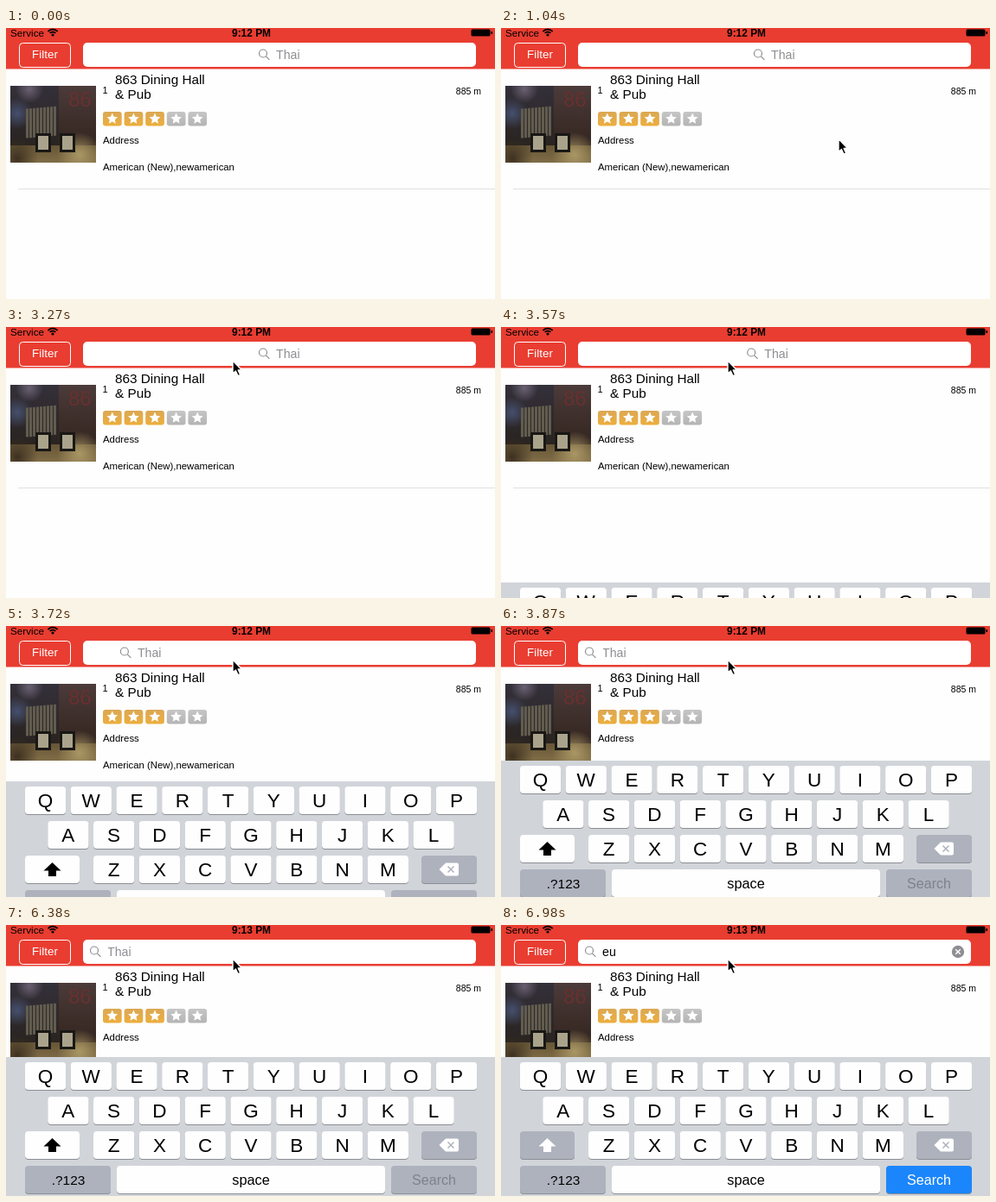
Write an HTML page with a canvas that moves like this. It is 565 px wide and 314 px high and loops after 8 s.

```html
<!DOCTYPE html>
<html lang="en">
<head>
<meta charset="utf-8">
<title>Restaurant search</title>
<style>
html, body { margin: 0; width: 100%; height: 100%; overflow: hidden; background: #fefefe; }
canvas { display: block; width: 565px; height: 314px; }
</style>
</head>
<body>
<canvas id="stage" width="565" height="314"></canvas>
<script>
const ctx = document.getElementById('stage').getContext('2d');
const LOOP = 8000;
const TICK = 148.5; // the picture updates on this beat
const FONT = '"Liberation Sans", Arial, sans-serif';
const RED = '#e93d31';
const GRAY = '#8e8e93';
const KEY = '#fefefe';
const DARK_KEY = '#adb2bd';

const lerp = (a, b, u) => a + (b - a) * u;
const progress = (t, from, to) => Math.min(1, Math.max(0, (t - from) / (to - from)));

function text(str, x, y, size, color = '#000', align = 'left', weight = '') {
  ctx.font = `${weight} ${size}px ${FONT}`;
  ctx.textAlign = align;
  ctx.fillStyle = color;
  ctx.fillText(str, x, y);
}

function rect(x, y, w, h, color) {
  ctx.fillStyle = color;
  ctx.fillRect(x, y, w, h);
}

function round(x, y, w, h, r, color) {
  ctx.beginPath();
  ctx.roundRect(x, y, w, h, r);
  ctx.fillStyle = color;
  ctx.fill();
}

function poly(points, color) {
  ctx.beginPath();
  points.forEach(([x, y]) => ctx.lineTo(x, y));
  ctx.closePath();
  ctx.fillStyle = color;
  ctx.fill();
}

function disc(x, y, r, color) {
  ctx.beginPath();
  ctx.arc(x, y, r, 0, Math.PI * 2);
  ctx.fillStyle = color;
  ctx.fill();
}

function stroke(color, width) {
  ctx.strokeStyle = color;
  ctx.lineWidth = width;
  ctx.stroke();
}

function cross(x, y, r, color) {
  ctx.beginPath();
  for (const side of [-1, 1]) {
    ctx.moveTo(x - r, y - r * side);
    ctx.lineTo(x + r, y + r * side);
  }
  stroke(color, 1.5);
}

function vertical(y, h, top, bottom) {
  const fill = ctx.createLinearGradient(0, y, 0, y + h);
  fill.addColorStop(0, top);
  fill.addColorStop(1, bottom);
  return fill;
}

function drawHeader(tick) {
  rect(0, 0, 565, 47.5, RED);
  text('Service', 5, 9.7, 11.7);
  for (const r of [4.4, 7.4]) {
    ctx.beginPath();
    ctx.arc(54, 9, r, -Math.PI * .77, -Math.PI * .23);
    stroke('#000', 1.6);
  }
  disc(54, 8, 1.6, '#000');
  text(tick < 30 ? '9:12 PM' : '9:13 PM', 283.5, 9.7, 11.9, '#000', 'center', 'bold');
  round(537.5, 1.5, 22, 8, 1.5, '#000');
  rect(560.5, 4, 1.5, 3, '#000');

  ctx.beginPath();
  ctx.roundRect(15.5, 17.5, 59, 28, 4);
  stroke('#fff', 1);
  text('Filter', 45, 35, 13.4, '#fff', 'center');
  round(89, 17, 454, 28, 5, '#fff');
}

function drawSearch(tick, slide) {
  const ease = (1 - Math.cos(Math.PI * progress(slide, 0, 250))) / 2;
  const x = lerp(312, 117, ease);
  ctx.beginPath();
  ctx.arc(x - 15, 29.5, 4.5, 0, Math.PI * 2);
  ctx.moveTo(x - 11.8, 32.7);
  ctx.lineTo(x - 7.6, 36.9);
  stroke(GRAY, 1.2);

  const typed = 'eu'.slice(0, Math.max(0, tick - 45));
  text(typed || 'Thai', x, 36, 14.2, typed ? '#000' : GRAY);
  if (typed) {
    disc(528, 31, 7.2, GRAY);
    cross(528, 31, 2.8, '#fff');
  } else if (tick > 25 && (tick - 26) % 7 < 4) {
    rect(116, 23, 2, 16, '#fff'); // blinking caret
  }
}

function glow(x, y, r, color) {
  const fill = ctx.createRadialGradient(x, y, 0, x, y, r);
  fill.addColorStop(0, color);
  fill.addColorStop(1, color + '00');
  rect(x - r, y - r, r * 2, r * 2, fill);
}

function drawPhoto() {
  ctx.save();
  ctx.translate(5, 67);
  ctx.beginPath();
  ctx.rect(0, 0, 99, 89);
  ctx.clip();
  rect(0, 0, 99, 89, vertical(0, 89, '#34303a', '#262019'));
  rect(56, 0, 43, 70, vertical(0, 70, '#4b3b3a', '#33251f'));
  glow(8, 32, 18, '#45506e');
  glow(22, 4, 16, '#696071');
  text('86', 67, 24, 24, '#69302f');
  for (let x = 18; x < 54; x += 4) rect(x, 28 - x / 12, 3, 34, '#625c4e');
  rect(0, 69, 99, 20, vertical(69, 20, '#665536', '#806d47'));
  glow(80, 80, 26, '#aa9765');
  glow(8, 84, 24, '#3d3020');
  for (const x of [29, 57]) {
    rect(x, 55, 18, 22, '#191815');
    rect(x + 3, 58, 12, 16, '#aaa38c');
  }
  ctx.restore();
}

function drawStars() {
  for (let i = 0; i < 5; i++) {
    const x = 112 + i * 24.6;
    const [top, bottom] = i < 3 ? ['#dba854', '#edae3d'] : ['#c6c6c6', '#b4b4b4'];
    round(x, 97, 21.7, 16.5, 3, vertical(97, 16.5, top, bottom));
    const star = Array.from({ length: 10 }, (_, k) => {
      const a = k * Math.PI / 5 - Math.PI / 2;
      const r = k % 2 ? 3.2 : 6.7;
      return [x + 10.8 + r * Math.cos(a), 105.3 + r * Math.sin(a)];
    });
    poly(star, '#fff');
  }
}

function drawListing() {
  drawPhoto();
  text('1', 111.5, 76, 11);
  text('863 Dining Hall', 126, 65, 15.3);
  text('& Pub', 126, 82, 15.3);
  text('885 m', 549, 77, 10.5, '#000', 'right');
  drawStars();
  text('Address', 112, 134, 11.4);
  text('American (New),newamerican', 112, 165, 11.35);
  rect(14, 186, 551, 1, '#e0e0e1');
}

function key(x, row, w, color = KEY) {
  const y = 6 + row * 40;
  round(x, y + 1, w, 32, 4, '#8b8e94');
  round(x, y, w, 32, 4, color);
}

function label(str, x, row, size, color = '#000') {
  text(str, x, 22 + row * 40 + size * .36, size, color, 'center');
}

function drawKeyboard(typed, top) {
  const pitch = 52.78;
  ctx.save();
  ctx.translate(0, top);
  rect(0, 0, 565, 162, '#d1d5da');

  ['QWERTYUIOP', 'ASDFGHJKL', 'ZXCVBNM'].forEach((letters, row) => {
    const left = 283 - (letters.length * pitch - 5.5) / 2;
    [...letters].forEach((letter, i) => {
      key(left + i * pitch, row, 47.3);
      label(letter, left + i * pitch + 23.6, row, 22.5);
    });
  });

  const arrow = typed ? '#fff' : '#000';
  key(22, 2, 63, typed ? DARK_KEY : KEY);
  poly([[53.5, 94], [63.5, 103.5], [43.5, 103.5]], arrow);
  rect(49, 103, 9, 7, arrow);

  key(480, 2, 64, DARK_KEY);
  poly([[500.5, 102], [508, 94.5], [508, 109.5]], '#fff');
  round(507, 94.5, 16, 15, 2, '#fff');
  cross(514, 102, 3.5, DARK_KEY);

  key(22, 3, 99, DARK_KEY);
  label('.?123', 72, 3, 15.4);
  key(128, 3, 310);
  label('space', 283, 3, 16.3);
  key(445, 3, 99, typed ? '#1b86fb' : DARK_KEY);
  label('Search', 494.5, 3, 16.1, typed ? '#fff' : '#7d828b');
  ctx.restore();
}

// Enters on a bow, rises, then later sweeps in a loop to the search field.
function pointerAt(tick) {
  if (tick < 15) {
    const enter = progress(tick, 3, 5);
    const rise = progress(tick, 6, 8);
    return [lerp(427, 390, enter) - 43 * Math.sin(Math.PI * enter), lerp(290, 177, enter) - 97 * rise];
  }
  const u = progress(tick, 15, 22);
  const arc = Math.sin(Math.PI * u);
  const swing = Math.sin(2 * Math.PI * u);
  return [lerp(357, 262, u) - 140 * swing - 38 * arc, lerp(77, 39, u) + 45 * swing + 35 * arc];
}

function drawPointer(tick) {
  if (tick < 3) return;
  ctx.save();
  ctx.translate(...pointerAt(tick));
  ctx.beginPath();
  poly([[0, 0], [0, 15], [3.4, 12], [6, 17.6], [8.6, 16.4], [6.2, 11], [10.6, 11]], '#000');
  ctx.lineJoin = 'round';
  stroke('#fff', 1.4);
  ctx.restore();
}

function draw(time) {
  const tick = Math.floor((time + 12) / TICK);
  const slide = (tick - 24) * TICK + 32;
  rect(0, 0, 565, 314, '#fefefe');
  drawHeader(tick);
  drawSearch(tick, slide);
  drawListing();
  if (slide > 0) {
    const u = slide * .0178; // critically damped spring
    drawKeyboard(tick > 45, 153 + Math.round(161 * (1 + u) * Math.exp(-u)));
  }
  drawPointer(tick);
}

const start = performance.now();
function frame() {
  draw((performance.now() - start) % LOOP);
  requestAnimationFrame(frame);
}
frame();
</script>
</body>
</html>
```
